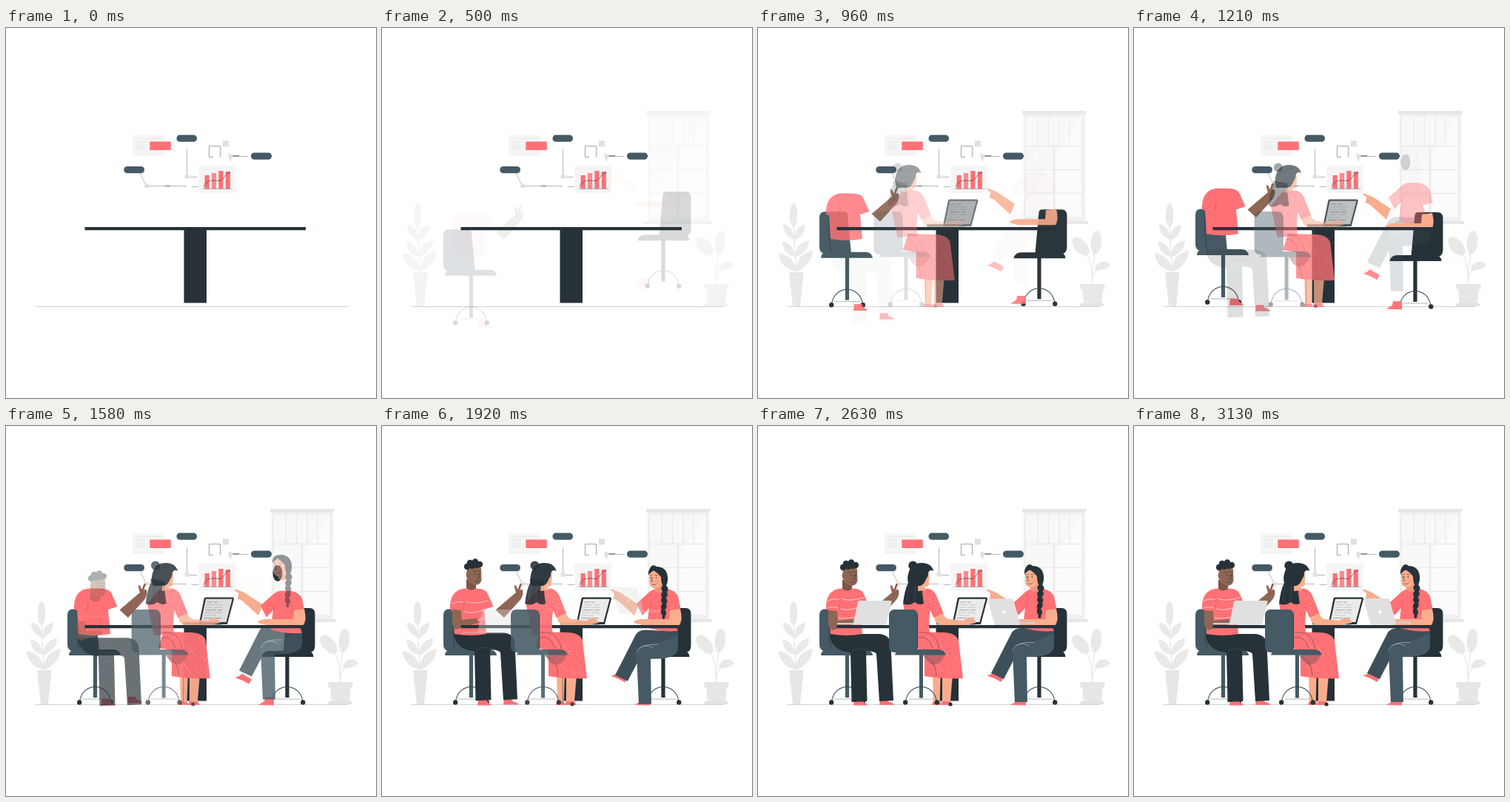
An HTML page with a canvas for the animation above (3210 ms loop, 500 px wide and 500 px high).

```html
<!DOCTYPE html>
<html lang="en">
<head>
<meta charset="utf-8">
<title>Team meeting</title>
<style>
html, body { margin: 0; width: 100%; height: 100%; overflow: hidden; background: #fff; }
canvas { display: block; width: 100vw; height: 100vh; object-fit: contain; }
</style>
</head>
<body>
<canvas id="stage" width="500" height="500"></canvas>
<script>
const LOOP = 3210;
const INK = '#263238', SLATE = '#455a64', CORAL = '#ff7175';
const SKIN = '#f9ad8d', BROWN = '#8f6653';
const stage = document.getElementById('stage').getContext('2d');
const layerCanvas = document.createElement('canvas');
layerCanvas.width = layerCanvas.height = 500;
const layer = layerCanvas.getContext('2d');
let c = stage;

// drawing helpers
function fill(d, color) {
  c.fillStyle = color;
  c.fill(new Path2D(d));
}
function line(d, color, width = 0.7) {
  c.strokeStyle = color;
  c.lineWidth = width;
  c.lineCap = 'round';
  c.stroke(new Path2D(d));
}
function box(x, y, w, h, color, r = 0) {
  c.fillStyle = color;
  c.beginPath();
  c.roundRect(x, y, w, h, r);
  c.fill();
}
function oval(x, y, rx, ry, color, turn = 0) {
  c.fillStyle = color;
  c.beginPath();
  c.ellipse(x, y, rx, ry, turn, 0, Math.PI * 2);
  c.fill();
}
const dot = (x, y, r, color) => oval(x, y, r, r, color);

// easing
function bounce(u) {
  const curve = (s, a, b) => 3 * s * (1 - s) ** 2 * a + 3 * s * s * (1 - s) * b + s ** 3;
  let lo = 0, hi = 1;
  for (let i = 0; i < 20; i++) {
    const mid = (lo + hi) / 2;
    if (curve(mid, 0.36, 0.5) < u) lo = mid; else hi = mid;
  }
  return curve(lo, -0.01, 1.5);
}
const quadOut = u => 1 - (1 - u) ** 2;

// scenery
function backdrop() {
  box(359, 116, 83, 146, '#f0f0f0');
  box(357, 112, 86.5, 4.5, '#e6e6e6');
  box(362, 120, 75, 135, '#f8f8f8');
  fill('M437 120V255H392L362 255V236Z', '#fbfbfb');
  for (const x of [378, 393, 407, 421]) line(`M${x} 120V159`, '#eaeaea', 1.2);
  for (const y of [159.5, 191.5, 223.5]) line(`M362 ${y}H437`, '#eaeaea', 1.4);
  line('M400 159V255', '#ebebeb', 3);
  box(353, 261, 93, 4, '#e6e6e6');

  const leaf = '#e9e9e9';
  oval(48, 253, 5.3, 16, leaf);
  fill('M48 286Q34 280 34 265Q47 267 49 284Q50 268 64 266Q63 281 50 287Z', leaf);
  fill('M49 309Q34 306 33 288Q47 291 50 307Q53 289 69 287Q69 302 50 310Z', leaf);
  fill('M50 329Q29 323 28 304Q46 307 51 324Q56 303 74 301Q72 321 53 329Z', leaf);
  line('M48 260Q49 300 52 331', leaf, 1.5);
  fill('M42 330H61.5L57 376H47Z', '#e6e6e6');

  oval(457, 290, 7.3, 16, leaf, 0.1);
  oval(436, 295, 8.5, 15, leaf, -0.72);
  fill('M455 328Q456 315 469 315.5Q475 317 476 321Q469 328 455 328Z', leaf);
  line('M451.5 346Q451 326 456 298M451.5 340Q452 317 441 301M451.5 342Q452 330 462 324', '#e0e0e0', 0.9);
  box(435.5, 346, 33, 7, '#e6e6e6', 1);
  fill('M438 353H466L464 373H440Z', '#e6e6e6');
  box(435, 372, 33, 4, '#e2e2e2', 2);
}

function diagram() {
  box(171, 145, 43, 28, '#f5f5f5');
  line('M177 149.3H211', '#e2e2e2', 0.7);
  for (let i = 0; i < 5; i++) line(`M177 ${153.5 + i * 2.5}H${i % 2 ? 186 : 188}`, '#dedede', 0.6);
  box(194.3, 153.5, 28.5, 11.5, CORAL);
  box(230.5, 144.5, 27.5, 9.3, SLATE, 4.6);
  box(159.3, 187, 27.7, 9.3, SLATE, 4.6);
  box(331, 168.5, 28, 9.3, SLATE, 4.6);
  box(293, 152.5, 8, 8, '#e0e0e0');
  line('M279.5 174.5H274.5V159.5H289.5V174', '#7d8589', 0.7);
  const wire = '#a2a7a9';
  line('M244.5 164V198M248 201.5H258M193 213.5H244M251 214.5H260M306 173.5H327M303.5 176V179M188.5 211L181.5 197', wire, 0.8);
  line('M216 213.5H221M307 172.8H315', '#4e565a', 0.9);
  for (const [x, y] of [[244.5, 200.7], [190, 213.3], [303, 173]]) dot(x, y, 3.1, '#e0e0e0');
  box(260.5, 185.5, 49.5, 37.5, '#f5f5f5');
  [199, 196, 193, 194].forEach((top, i) =>
    box(268.5 + i * 9.4, top, 6.2, 217.3 - top, i === 1 ? '#ff8a8d' : CORAL));
  line('M265.5 217.3H306', '#82898d', 0.7);
  line('M267 214.5C270 207 274 206.5 280 206C286 206 290 208 294 203C297 198 299 195.5 303 195.5', INK, 0.6);
}

function tableTop() {
  box(106.5, 268.9, 298.5, 4.3, INK);
  box(240.5, 273, 30.5, 98.5, INK);
}

function chairBase(x) {
  c.save();
  c.translate(x, 0);
  line('M-17 369H17', '#8d979b', 0.7);
  line('M-21 372C-17 346 17 346 21 372', '#37474f', 1.1);
  dot(-21.3, 373.5, 3.2, INK);
  dot(21.3, 373.5, 3.2, INK);
  c.restore();
}
function sideChair(x, flip, color, top, seat) {
  c.save();
  c.translate(x, 0);
  c.scale(flip, 1);
  fill(`M-30 ${top}H-4Q0 ${top} 0.5 ${top + 4}L5.5 ${seat + 2}H-29Q-37.5 ${seat + 2} -37.5 ${seat - 7}V${top + 8}Q-37.5 ${top} -30 ${top}Z`, color);
  line(`M-24 ${top + 2}Q-26 ${top + 32} -22 ${seat}`, INK, 0.6);
  fill(`M-35.5 ${seat + 8}Q-35 ${seat} -27 ${seat}H24Q33 ${seat} 34.5 ${seat + 8}Z`, color);
  box(-2.6, seat + 7, 5.2, 360 - seat, color);
  c.restore();
  chairBase(x);
}

// man on the left
function manLegs() {
  fill('M98 281H165Q179 283 179.5 296L183 371L164 372L160 308Q159 304 146 304L147.5 372L126.5 373L125 306Q101 304 97 284Z', INK);
  line('M127 304Q141 297 160 307', '#455158', 0.6);
}
const manShoeA = () => fill('M130 368.5H141L142 372.5L147.5 376V377.5H129Z', CORAL);
const manShoeB = () => fill('M165 368.5H175L176 372L184 375.5V377H164Z', CORAL);
function manShirt() {
  fill('M105 221Q111 219 115 219.5H127Q139 220 142 225L150.5 244L138 248L141 281Q120 285 98 281L96 249L92 248Q91 227 105 221Z', CORAL);
  line('M108 250Q113 240 110 231', '#d9575d', 0.6);
}
function manStripes() {
  line('M95 236Q101 233 110 234M113 233Q122 238 143 232M94 246Q100 243 108 246M112 247Q123 251 138 244M109 259Q122 262 139 256', '#ffd9da', 0.9);
}
function manArm() {
  fill('M95 249L107 250L108 263L128 261L131 267L108 273Q96 281 95 266Z', BROWN);
}
function manHand() {
  fill('M153.5 248.5L165 259L185 237Q191 231 190.5 223Q189 219 186 222L189 214Q187.5 211.5 186 214L183.5 221L181 215.5Q178.5 214 179 218L181 225Z', BROWN);
  line('M184 226L182.5 231', '#69463a', 0.5);
}
function manHead() {
  fill('M114 208L127 211V220Q121 225 114 220Z', '#7d5645');
  fill('M115 193Q124 187 134 193L134.5 209Q133 216 126 216Q116 214 114 204Z', BROWN);
  for (const [x, y, r] of [[115, 191, 4.2], [119, 186, 4.3], [126, 184.5, 4.2], [132, 188, 4.2], [122, 190, 4], [128, 189, 4]]) dot(x, y, r, INK);
  oval(115.5, 202, 2, 3, BROWN);
  line('M123 198L127 197M130 197L133 198M129.5 201L131.5 207L129 207.5M125 210.5Q129 213 131.5 210.5', INK, 0.6);
  dot(125.5, 201.5, 0.8, INK);
  dot(131.8, 201.5, 0.8, INK);
}
function manLaptop() {
  box(107, 266, 30, 2.3, '#cfcfcf');
  fill('M137 236H179Q181 236 180.5 238L173 268.5H128.5L135 238Q135.4 236 137 236Z', '#e0e0e0');
}

// woman on the right
function rightLegs() {
  fill('M359 273Q346 272 342 281L315 334L332 342L354 300L400 298V275Z', '#3d5059');
  fill('M400 281L372 291Q344 291 344 304L347 373H364L363 312Q399 313 400 298Z', SLATE);
  line('M344 303Q348 291 373 292.5M350 296Q358 292 366 297', '#a7b1b5', 0.7);
}
const rightShoeA = () => fill('M341 377L349 372L350 366.5H362V377.5Z', CORAL);
const rightShoeB = () => fill('M309.5 337.5Q315 336 319 332L332 339.5L328.5 346Q319 340 309.5 337.5Z', CORAL);
function rightShirt() {
  fill('M363 223Q368 219.5 374 220H385Q396 222 400 230L403.5 247L390 250L400 277Q376 279 358 272L361 246L352 256L344 240Q356 229 363 223Z', CORAL);
  line('M389 250Q384 242 386 234M361 246L364 238', '#d9575d', 0.6);
}
function rightPoint() {
  fill('M308.5 221.5Q310 220 314 222L321 224.5L347 241.5L341 256L319 236L312 233Q315 230 314 226Z', SKIN);
  line('M314 229L318 231', '#d98768', 0.5);
}
function rightArm() {
  fill('M389 249L403 247Q407 262 402 269H352L340 266Q340 262 350 261L388 261Z', SKIN);
}
const rightTemple = () => oval(367, 198, 6.5, 11, INK);
function rightHead() {
  fill('M368 208L380 206V221Q374 227 368 221Z', '#e9967a');
  fill('M361 197Q365 193 377 196L379 209Q376 219 368 218.5Q361 217 361 209Z', SKIN);
  fill('M360 200Q359 189 372 189Q385 190 386 203Q387 212 382 218Q377 214 377 203Q372 197 367 194Q363 197 360 200Z', INK);
  [219, 227, 235, 243, 251].forEach((y, i) => oval(382 - i * 0.4, y, 4.5 - i * 0.25, 5, INK, i % 2 ? 0.3 : -0.3));
  oval(380.5, 257, 2, 3, INK);
  line('M362.5 201L365 200.5M369 200.5L372.5 201M365.5 203.5L364 209H366M365 213Q369 215 371 212', INK, 0.6);
  dot(363.5, 204, 0.8, INK);
  dot(370.5, 204, 0.8, INK);
  oval(373, 209, 2, 1.4, '#ff8d80');
}
function rightLaptop() {
  box(347, 264.5, 28, 2.3, '#cfcfcf');
  fill('M312 233H343Q345 233 345.5 235L354.5 268.5H320L310.5 235Q310 233 312 233Z', '#e0e0e0');
  dot(332.5, 251, 2.2, '#fff');
}

// woman in the middle
function midSkirt() {
  fill('M236 336H247L245.5 373H237ZM249 336H263L260 372H249Z', SKIN);
  fill('M236 373H246L248 377H235ZM249 372H260L263 377H247Z', CORAL);
  fill('M214 278L252 279Q268 280 271 290L277 341Q250 342 225 338L225 303L207 300Z', CORAL);
  for (let i = 0; i < 20; i++) {
    const x = 229 + (i * 17) % 41, y = 285 + (i * 11) % 51;
    line(`M${x} ${y}l1.4 1.5`, '#ffc0c2', 0.7);
  }
}
function midLaptop() {
  box(241, 265.3, 53, 3.2, '#56636a', 1);
  fill('M271.5 231.5H308Q310.5 231.5 310 234L301 268H265Q262.5 268 263 265.5L269.5 233.5Q270 231.5 271.5 231.5Z', INK);
}
function midScreen() {
  fill('M272 233.7H307.7L299.5 265H265.3Z', '#ebebeb');
  for (let i = 0; i < 7; i++) {
    const y = 238 + i * 3.6, x = 274 - i * 0.75;
    line(`M${x} ${y}h${6 + (i * 5) % 8}m3 0h${4 + (i * 3) % 7}`, i % 3 ? '#b4b9bb' : '#7c858a', 0.7);
  }
}
function midTop() {
  fill('M238 257L250 252Q252 260 258 261L278 263Q285 256 293 262L294.5 266L281 269H246Q238 266 238 257Z', SKIN);
  line('M281 264L288 262L293 265', '#d98768', 0.5);
  fill('M211 222L230 219.5Q238 222 241 229L250.5 253L237 259L233 249Q230 263 232 281L205 283Q199 255 196 240Z', CORAL);
  line('M233 249L231 239', '#d9575d', 0.6);
  for (let i = 0; i < 9; i++) line(`M${226 + (i * 7) % 15} ${229 + i * 2.7}l1.3 1`, '#ffc0c2', 0.6);
}
function midHead() {
  fill('M217 198L230.5 195L231.5 203L230.5 215Q227 218 225 217L227 222L216 223Z', SKIN);
  fill('M203 200Q206 185 221 185Q234 185 237.5 196Q232 193.5 230 198Q230 204 227 207Q225 214 219 216H204Q201 207 203 200Z', INK);
}
function midTail() {
  dot(209.3, 188.5, 6, INK);
  fill('M203 206L222 210Q221 222 224 240Q217 243 212 238Q204 244 196 240Q198 222 203 212Z', INK);
  line('M207 208Q202 225 201 236M214 211Q211 224 211 236M209 199Q217 190 229 190', '#4c5b63', 0.5);
}
function midChair() {
  fill('M224 309H252Q249 321 238 323Q228 321 224 309Z', '#c0646a');
  line('M217 279Q236 277 241 289Q244 294 245 301M217 286Q231 282 236 300M222 310Q240 314 241 337', '#5a4a50', 0.6);
  line('M247 340V374', INK, 0.6);
  box(177, 248, 39, 58, SLATE, 7);
  line('M215.5 255V300', INK, 0.7);
  fill('M185 309.5Q186 304.5 192 303.5L216 302H244Q252 302.5 254 309.5Z', SLATE);
  box(218, 308, 5, 59.5, SLATE);
  chairBase(220.5);
  dot(260, 376, 2.6, INK);
}

// timeline, in painting order
const still = draw => ({ draw, still: true });
const fade = (start, draw) => ({ start, draw, time: 1000, dx: 0, dy: 0, ease: quadOut, soft: 1 });
const rise = (start, draw, soft = 1, time = 1150) => ({ start, draw, time, dx: 0, dy: 30, ease: bounce, soft });
const drop = (start, draw, soft = 1, time = 1150) => ({ start, draw, time, dx: 0, dy: -30, ease: bounce, soft });
const slide = (start, time, draw, soft = 1) => ({ start, draw, time, dx: -25, dy: 0, ease: quadOut, soft });

const parts = [
  fade(250, backdrop),
  still(() => line('M40 376.5H461', '#c4c4c4', 0.8)),
  still(diagram),
  rise(260, () => sideChair(120.5, 1, SLATE, 247.5, 302)),
  drop(260, () => sideChair(380, -1, INK, 246, 304)),
  rise(350, manShoeA),
  rise(450, manShoeB, 1, 1500),
  rise(600, manLegs, 2, 1900),
  rise(310, manHand),
  rise(340, manShirt, 1.4),
  rise(1300, manStripes),
  rise(1150, manArm, 1.4),
  rise(1160, manHead, 1.4),
  drop(350, rightShoeA),
  drop(450, rightShoeB, 1, 1500),
  drop(650, rightLegs, 2, 1700),
  drop(340, rightPoint, 1.4),
  drop(720, rightShirt, 2),
  drop(310, rightArm, 1.2),
  drop(820, rightTemple, 2),
  drop(1160, rightHead),
  still(tableTop),
  rise(1450, manLaptop, 2),
  drop(1500, rightLaptop, 1.5),
  slide(520, 1340, midSkirt),
  slide(550, 1430, midLaptop, 0.6),
  slide(550, 1430, midScreen),
  slide(650, 1700, midTop),
  slide(800, 1700, midTail),
  slide(660, 1700, midHead, 0.7),
  slide(800, 1700, midChair)
];

function paint(part, now) {
  if (part.still) return part.draw();
  const u = Math.min(1, (now - part.start) / part.time);
  if (u <= 0) return;
  const p = part.ease(u);
  const alpha = Math.min(1, Math.max(0, p)) ** part.soft;
  c = alpha < 1 ? layer : stage;
  if (alpha < 1) layer.clearRect(0, 0, 500, 500);
  c.save();
  c.translate(part.dx * (1 - p), part.dy * (1 - p));
  part.draw();
  c.restore();
  c = stage;
  if (alpha < 1) {
    stage.globalAlpha = alpha;
    stage.drawImage(layerCanvas, 0, 0);
    stage.globalAlpha = 1;
  }
}

const begin = performance.now();
function frame() {
  const now = (performance.now() - begin) % LOOP;
  box(0, 0, 500, 500, '#fff');
  for (const part of parts) paint(part, now);
  requestAnimationFrame(frame);
}
frame();
</script>
</body>
</html>
```
